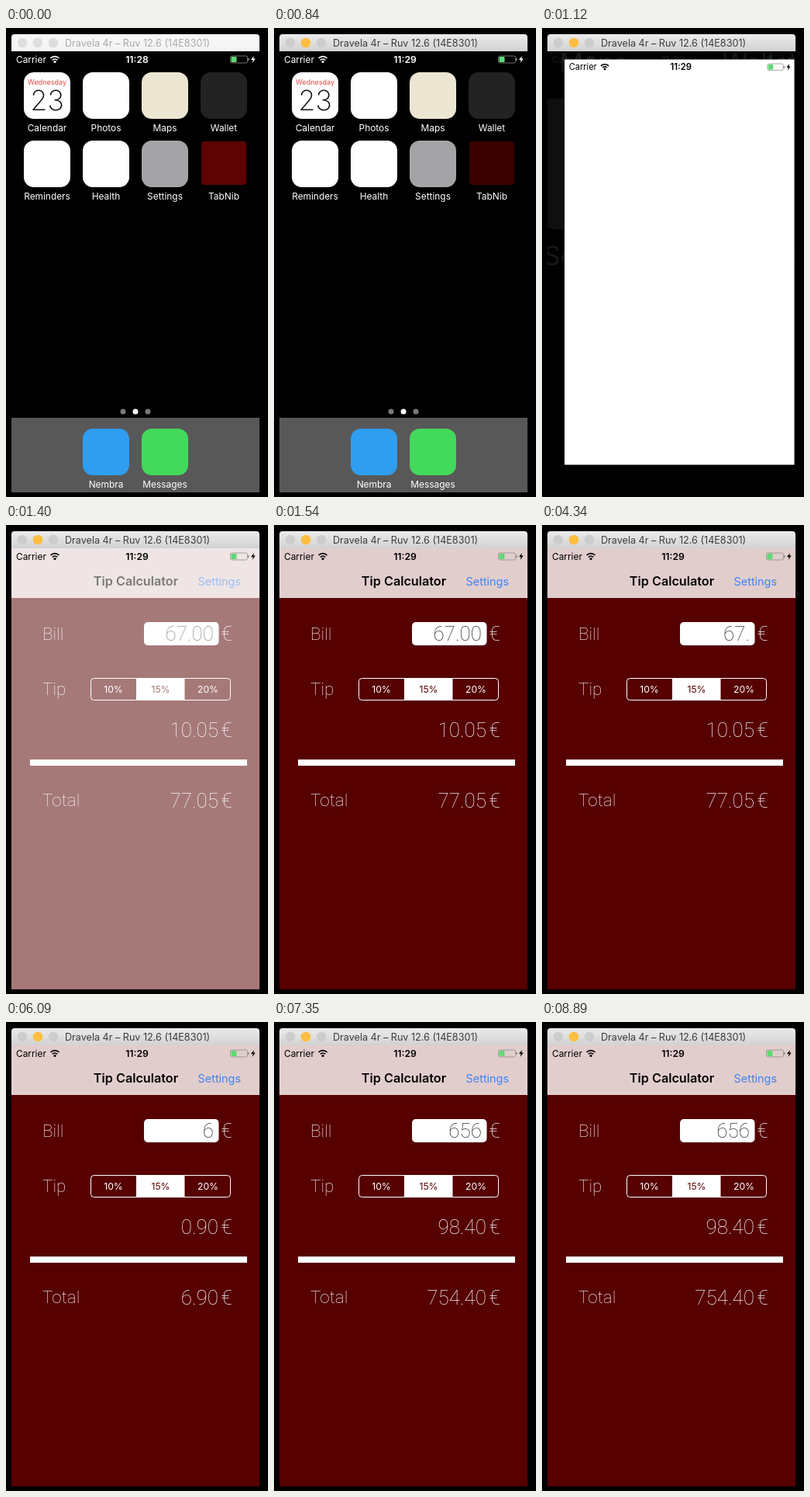
An HTML page with a canvas for the animation above (8960 ms loop, 338 px wide and 604 px high).

```html
<!DOCTYPE html>
<html lang="en">
<head>
<meta charset="utf-8">
<title>Tip Calculator</title>
<style>
html, body { margin: 0; width: 100%; height: 100%; overflow: hidden; background: #000; }
canvas { display: block; }
</style>
</head>
<body>
<canvas id="stage" width="338" height="604"></canvas>
<script>
const c = document.getElementById('stage').getContext('2d');
const LOOP = 8960;
const UI = 'Inter, sans-serif', THIN = 'Roboto, sans-serif';
const clamp = v => Math.max(0, Math.min(1, v));
const mix = (a, b, p) => a + (b - a) * p;

function box(x, y, w, h, color, r = 0) {
  c.fillStyle = color;
  c.beginPath();
  c.roundRect(x, y, w, h, r);
  c.fill();
}

function dot(x, y, r, color) {
  c.fillStyle = color;
  c.beginPath();
  c.arc(x, y, r, 0, 7);
  c.fill();
}

function text(s, x, y, size, color, align = 'left', weight = 400, family = UI) {
  c.font = `${weight} ${size}px ${family}`;
  c.textAlign = align;
  c.fillStyle = color;
  c.fillText(s, x, y);
}

function layer(alpha, draw) {
  c.save();
  c.globalAlpha *= alpha;
  draw();
  c.restore();
}

function titleBar(active) {
  const shade = c.createLinearGradient(0, 8, 0, 30);
  shade.addColorStop(0, active ? '#ebebeb' : '#f7f7f7');
  shade.addColorStop(1, active ? '#d2d2d2' : '#f4f4f4');
  box(7, 8, 320, 22, shade, [4, 4, 0, 0]);
  const off = active ? '#cdcdcd' : '#dedede';
  [off, active ? '#fdbe41' : off, off].forEach((color, i) => dot(21 + 20 * i, 19, 6.3, color));
  text('Dravela 4r – Ruv 12.6 (14E8301)', 76, 23.5, 12.6, active ? '#3c3c3c' : '#a9a9a9');
}

// Coordinates are relative to the phone screen.
function statusBar(color, time) {
  text('Carrier', 6, 14.7, 11.9, color);
  text(time, 162, 14.7, 12.2, color, 'center', 600);
  c.strokeStyle = color;
  c.lineWidth = 1.7;
  for (const r of [4.5, 7.8]) {
    c.beginPath();
    c.arc(56, 14.5, r, -Math.PI * .75, -Math.PI * .25);
    c.stroke();
  }
  dot(56, 13.5, 1.6, color);
  c.lineWidth = .8;
  c.strokeStyle = '#8c8c8c';
  c.beginPath();
  c.roundRect(282.5, 6, 22, 9, 2);
  c.stroke();
  box(305, 8.8, 1.5, 3.4, '#8c8c8c', .7);
  box(283.5, 7, 7, 7, '#5fd975', 1);
  c.fillStyle = color;
  c.beginPath();
  [[313, 6], [309, 11], [311.6, 11], [310.6, 15], [314.8, 9.6], [312.2, 9.6]]
    .forEach(([x, y]) => c.lineTo(x, y));
  c.fill();
}

function icon(name, x, y, color) {
  box(x, y, 60, 60, color, 13);
  text(name, x + 30, y + 76, 11.9, '#fff', 'center');
}

function home(pressed) {
  icon('Calendar', 23, 57, '#fff');
  text('Wednesday', 53, 73, 9, '#e2493f', 'center');
  text('23', 53, 106, 36, '#111', 'center', 200);
  icon('Photos', 99, 57, '#fff');
  icon('Maps', 175, 57, '#ebe5d2');
  icon('Wallet', 251, 57, '#222');
  icon('Reminders', 23, 145, '#fff');
  icon('Health', 99, 145, '#fff');
  icon('Settings', 175, 145, '#a4a4a6');
  box(252, 146, 58, 56, pressed ? '#3b0000' : '#5d0303', 4);
  text('TabNib', 281, 221, 11.9, '#fff', 'center');
  [151, 167, 183].forEach((x, i) => dot(x, 494, 3.5, i === 1 ? '#fff' : '#7a7a7a'));
  box(7, 502, 320, 96, '#585858');
  icon('Nembra', 99, 516, '#2f9df0');
  icon('Messages', 175, 516, '#43d95c');
}

function amount(s, right, y, color = '#fff') {
  text(s, right, y, 26, color, 'right', 100, THIN);
  text('€', 277.5, y, 26, '#fff', 'left', 100, THIN);
}

function calculator(bill) {
  const value = Number(bill), tip = value * .15;
  box(7, 30, 320, 568, '#560000');
  box(7, 30, 320, 64, '#e2cdcd');
  text('Tip Calculator', 167.5, 78, 16.2, '#000', 'center', 600);
  text('Settings', 303, 78, 14.4, '#3f83f2', 'right');
  [['Bill', 148], ['Tip', 219], ['Total', 362]]
    .forEach(([s, y]) => text(s, 47, y, 22.5, '#fff', 'left', 100, THIN));
  box(178, 125, 96.5, 30, '#fff', 5);
  amount(bill, 268, 149, '#222');

  c.strokeStyle = '#fff';
  c.lineWidth = 1;
  c.beginPath();
  c.roundRect(109.5, 197.5, 180, 28, 4);
  c.stroke();
  box(168, 197, 62.5, 29, '#fff');
  ['10%', '15%', '20%'].forEach((s, i) =>
    text(s, 138.5 + 61 * i, 216.3, 12.2, i === 1 ? '#560000' : '#fff', 'center'));

  amount(tip.toFixed(2), 274, 272.5);
  box(31, 302, 280, 8, '#fff');
  amount((value + tip).toFixed(2), 274, 363.5);
}

// Bill field after each keystroke
const keys = [[0, '67.00'], [3570, '67.0'], [3990, '67.'], [4550, '67'],
  [5670, '6'], [6230, '65'], [6720, '656']];

function draw(t) {
  const time = t < 490 ? '11:28' : '11:29';
  const grow = 1 - (1 - clamp((t - 910) / 350)) ** 2.6;
  const reveal = clamp((t - 1270) / 250);
  c.setTransform(1, 0, 0, 1, 0, 0);
  box(0, 0, 338, 604, '#000');

  c.save();
  c.beginPath();
  c.rect(7, 30, 320, 568);
  c.clip();
  if (grow < 1) layer(1 - grow, () => {
    layer(1, () => {
      c.translate(7, 30);
      statusBar('#fff', time);
    });
    const zoom = 1 + 2 * grow;
    c.translate(281, 175);
    c.scale(zoom, zoom);
    c.translate(-281, -175);
    home(t >= 770);
  });
  if (grow > 0) {
    const x = mix(251, 7, grow), y = mix(146, 30, grow);
    const w = mix(60, 320, grow), h = mix(60, 568, grow);
    layer(clamp(grow * 3), () => {
      box(x, y, w, h, '#fff');
      if (reveal) layer(1, () => {
        calculator(keys.findLast(k => k[0] <= t)[1]);
        if (reveal < 1) layer(1 - reveal, () => box(7, 30, 320, 568, '#fff'));
      });
      c.translate(x, y);
      c.scale(w / 320, w / 320);
      statusBar('#000', time);
    });
  }
  c.restore();
  titleBar(t >= 350);
}

const start = performance.now();
function tick() {
  draw((performance.now() - start) % LOOP);
  requestAnimationFrame(tick);
}
tick();
</script>
</body>
</html>
```
